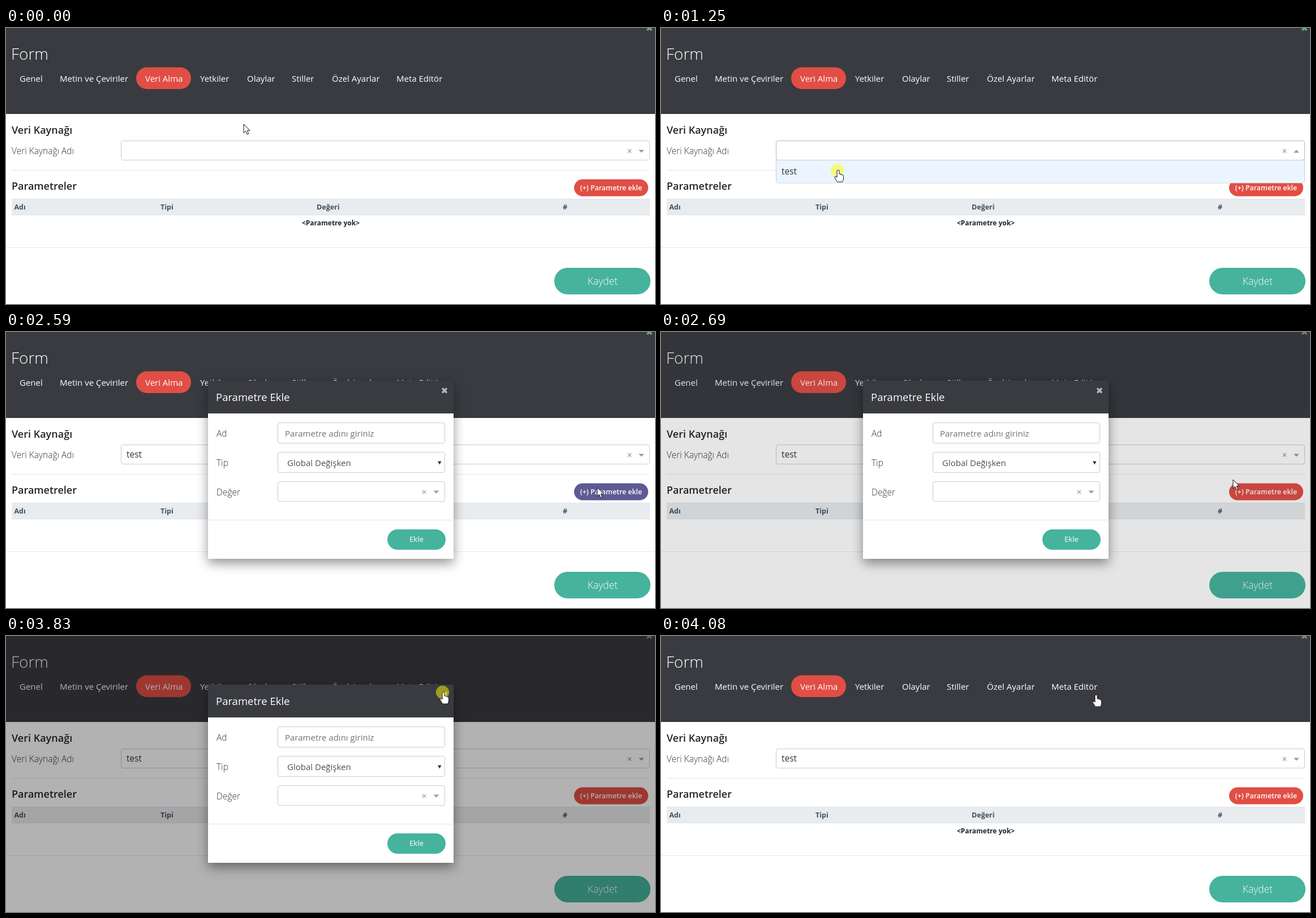
An HTML page that plays this animation: 1147 by 488 pixels, repeating every 4120 ms.

```html
<!DOCTYPE html>
<html lang="tr">
<head>
<meta charset="utf-8">
<title>Form</title>
<style>
  html, body { margin: 0; width: 100%; height: 100%; overflow: hidden; background: #fff; }
  svg { display: block; font: 15px "Open Sans", "Noto Sans", sans-serif; fill: #333; }
  .dark { fill: #3a3b40; }
  .red { fill: #e14e45; }
  .teal { fill: #46b39d; }
  .white { fill: #fff; }
  .mid { text-anchor: middle; }
  .light { font-weight: 300; font-size: 15.5px; }
  .value { font-size: 15.5px; }
  .heading { font-weight: 600; font-size: 18px; fill: #212529; }
  .cells { font-weight: 700; font-size: 12.5px; fill: #495057; }
  .box { fill: #fff; stroke: #ccc; }
  .line { stroke: #e3e6e8; fill: none; }
  .mark { fill: #8fa19f; }
  .cross { stroke: #8fa19f; stroke-width: 1.2; fill: none; }
  .close { stroke: #b4b6b9; stroke-width: 3.4; fill: none; }
  #modal { filter: drop-shadow(0 8px 10px rgba(0, 0, 0, .42)); }
  #pointer path { fill: #fff; stroke: #111; stroke-linejoin: round; }
</style>
</head>
<body>
<svg width="1147" height="488" viewBox="0 0 1147 488">
  <rect class="white" width="1147" height="488"/>
  <rect class="dark" width="1147" height="152"/>
  <path id="formClose" class="close" d="M1133-4l8 8m0-8l-8 8"/>
  <text class="white" x="9" y="56" font-size="28" font-weight="300">Form</text>
  <rect class="red" x="230" y="69.5" width="97" height="38.5" rx="19.2"/>
  <g class="white">
    <text x="24" y="95">Genel</text>
    <text x="95" y="95">Metin ve Çeviriler</text>
    <text x="246" y="95">Veri Alma</text>
    <text x="343" y="95">Yetkiler</text>
    <text x="426" y="95">Olaylar</text>
    <text x="505" y="95">Stiller</text>
    <text x="576" y="95">Özel Ayarlar</text>
    <text x="690" y="95">Meta Editör</text>
  </g>

  <text class="heading" x="10" y="187">Veri Kaynağı</text>
  <text class="light" x="10" y="223">Veri Kaynağı Adı</text>
  <path class="line" d="M10 251.5H1138M0 388.5H1147"/>
  <text class="heading" x="10" y="286">Parametreler</text>
  <rect id="add" class="red" x="1004" y="267.5" width="131" height="30" rx="15"/>
  <text class="white mid" x="1069.5" y="287" font-size="12.4" font-weight="600">(+) Parametre ekle</text>
  <rect x="10" y="302" width="1128" height="29" fill="#e9ecef"/>
  <path d="M10 302.5H1138M10 330.5H1138" stroke="#dee2e6"/>
  <g class="cells">
    <text x="14.5" y="321">Adı</text>
    <text x="273" y="321">Tipi</text>
    <text x="549" y="321">Değeri</text>
    <text x="984" y="321">#</text>
  </g>
  <text class="mid" x="574" y="349" font-size="12" font-weight="700" fill="#212529">&lt;Parametre yok&gt;</text>
  <rect class="teal" x="969" y="424" width="170" height="47" rx="23.5"/>
  <text class="white mid" x="1054.5" y="454" font-size="17.5" font-weight="300">Kaydet</text>

  <rect id="ring" x="202" y="198" width="937" height="37" rx="5.5" fill="none" stroke="#007eff" stroke-opacity=".13" stroke-width="4"/>
  <rect id="select" class="box" x="203.5" y="199.5" width="934" height="34" rx="3.5"/>
  <path class="cross" d="M1099 214.5l6 6m0-6l-6 6"/>
  <path id="caret" class="mark"/>
  <text id="value" class="value" x="213" y="222">test</text>
  <g id="menu">
    <path class="box" d="M203.5 233.5H1137.5V270.5a3.5 3.5 0 0 1-3.5 3.5H207a3.5 3.5 0 0 1-3.5-3.5z"/>
    <rect x="204" y="234" width="933" height="38.5" fill="#ebf5ff"/>
    <text class="value" x="213" y="259">test</text>
  </g>

  <rect id="backdrop" width="1147" height="488" fill="#000"/>

  <g id="modal">
    <rect class="white" x="357" y="86" width="434" height="315"/>
    <rect class="dark" x="357" y="86" width="434" height="58"/>
    <text class="white" x="371" y="122" font-size="18.5">Parametre Ekle</text>
    <path class="close" d="M771 99.5l8 8m0-8l-8 8"/>
    <g class="light">
      <text x="372" y="185">Ad</text>
      <text x="372" y="237">Tip</text>
      <text x="372" y="289">Değer</text>
    </g>
    <g class="box">
      <rect x="480.5" y="160.5" width="295" height="36" rx="3.5"/>
      <rect x="480.5" y="212.5" width="295" height="36" rx="3.5"/>
      <rect x="480.5" y="264.5" width="295" height="35" rx="3.5"/>
    </g>
    <text x="493" y="185" fill="#6c757d">Parametre adını giriniz</text>
    <text x="497" y="237" fill="#495057">Global Değişken</text>
    <path d="M763 228.5h6.5l-3.2 6z"/>
    <path class="cross" d="M736 280l6 6m0-6l-6 6"/>
    <path class="mark" d="M755.5 280.5h10l-5 5z"/>
    <path class="line" d="M357 332.5H791"/>
    <rect class="teal" x="674" y="349" width="103" height="36" rx="18"/>
    <text class="white mid" x="725.5" y="371" font-size="13.2">Ekle</text>
  </g>

  <g id="pointer">
    <circle id="click" cx="-1.5" cy=".5" r="11.7" fill="#ff0" fill-opacity=".5"/>
    <path id="arrow" d="M0 0V15.5L3.6 12.2 6.2 18.2 8.8 17 6.2 11.3H11Z"/>
    <path id="hand" d="M-2 1.6Q-2 0 0 0T2 1.6V7Q4.5 6 5 8 7 7 7.5 9 9.5 8.5 9.5 10.5V15Q9.5 18 7.5 21H-1.5L-6 13.5Q-6.5 11-4 11.5L-2 13Z"/>
  </g>
</svg>
<script>
const LOOP = 4120;
const tickStarts = [0, 620, 1150, 1690, 3830, 3850, 4080];
// Pointer tip: time, x, y
const track = [
  [0, 420, 170], [100, 416, 173], [500, 314, 225], [620, 312, 226], [820, 312, 228],
  [1120, 313, 251], [1350, 313, 251], [1690, 600, 264], [2090, 1035, 273],
  [2290, 1045, 275], [2590, 1045, 275], [3090, 877, 205], [3690, 779, 105],
  [3830, 773, 99], [3950, 773, 99], [4080, 769, 104]
];
const parts = {};
document.querySelectorAll('[id]').forEach(el => parts[el.id] = el);

const set = (id, name, value) => parts[id].setAttribute(name, value);
const show = (id, on) => set(id, 'visibility', on ? 'visible' : 'hidden');
const ramp = (t, from, to) => Math.min(1, Math.max(0, (t - from) / (to - from)));

function tick(t) {
  const start = tickStarts.findLast(s => s <= t);
  return start + Math.floor((t - start) / 100) * 100;
}

function pointerAt(t) {
  const i = Math.max(1, track.findIndex(key => key[0] >= t));
  const [t0, x0, y0] = track[i - 1], [t1, x1, y1] = track[i];
  const k = ramp(t, t0, t1);
  return [x0 + (x1 - x0) * k, y0 + (y1 - y0) * k];
}

function draw(t) {
  const during = (from, to) => t >= from && t < to;
  const open = during(720, 1350), focused = during(1350, 2390);

  show('menu', open);
  show('ring', focused);
  show('value', t >= 1350);
  parts.select.style.stroke = focused ? '#2a78d0' : open ? '#b8b8b8' : '#ccc';
  set('caret', 'd', open ? 'M1118 220.5h10l-5-5z' : 'M1118 215.5h10l-5 5z');
  parts.add.style.fill = during(2390, 2690) ? '#5f5a94' : '';
  parts.formClose.style.stroke = t < 2690 ? '#6fa79b' : '#85868f';

  set('backdrop', 'opacity', .3 * (ramp(t, 2590, 2890) - ramp(t, 3950, 4080)));
  set('modal', 'opacity', ramp(t, 2390, 2540) - ramp(t, 3850, 4050));

  const hand = during(1020, 1350) || during(1990, 2390) || t >= 3690;
  show('hand', hand);
  show('arrow', !hand);
  show('click', during(620, 720) || during(1150, 1350) || during(2290, 2390) || during(3830, 3950));
  set('pointer', 'transform', `translate(${pointerAt(t).map(Math.round)})`);
}

function loop() {
  draw(tick(performance.now() % LOOP));
  requestAnimationFrame(loop);
}
loop();
</script>
</body>
</html>
```
